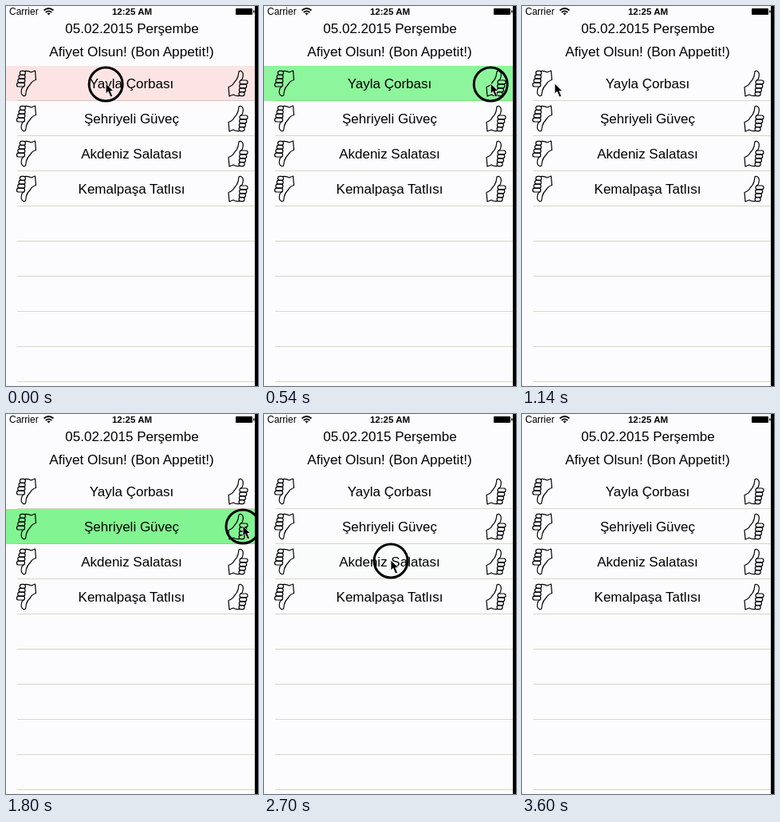
Write an HTML page that moves like this. It is 316 px wide and 476 px high and loops after 3690 ms.

```html
<!DOCTYPE html>
<html lang="tr">
<head>
<meta charset="utf-8">
<style>
  html, body { margin: 0; width: 100%; height: 100%; overflow: hidden; background: #fcfcfe; }
  svg { display: block; width: 316px; height: 476px; }
  text { font: 17px "Liberation Sans", Arial, sans-serif; text-anchor: middle; }
  .line { fill: none; stroke: #000; }
</style>
</head>
<body>
<svg viewBox="0 0 316 476">
  <defs>
    <g id="thumb" class="line" stroke-width="1.2" stroke-linejoin="round">
      <path d="M16 13L18 12Q20 7 19 4Q17 0 14 2L13 8Q12 12 8 16Q6 20 1 21.5L2 33L7 31Q10 33 15 32.5"/>
      <g id="fingers"></g>
    </g>
  </defs>
  <rect width="316" height="476" fill="#fcfcfe"/>
  <g id="lines" stroke="#d6d6c6"></g>
  <rect id="highlight" width="312" height="44"/>

  <text x="4" y="11" style="font-size:12px;text-anchor:start">Carrier</text>
  <g class="line" stroke-width="1.7">
    <path d="M47.5 5.5Q53.5 .5 59.5 5.5M49.7 8Q53.5 4.8 57.3 8"/>
    <path d="M53.5 11.5L51.5 9.3Q53.5 7.8 55.5 9.3Z" fill="#000" stroke="none"/>
  </g>
  <text x="158" y="11" style="font-size:11.5px;font-weight:bold">12:25 AM</text>
  <rect x="288" y="3" width="21" height="8" rx="1"/>
  <rect x="310" y="5.5" width="1.5" height="3"/>

  <text x="158" y="34">05.02.2015 Perşembe</text>
  <text x="157.5" y="63" style="font-size:17.2px">Afiyet Olsun! (Bon Appetit!)</text>
  <g id="rows"></g>
  <rect x="312" width="4" height="476"/>

  <g id="pointer">
    <circle id="ring" class="line" cy="1" r="21" stroke-width="3"/>
    <path d="M0 0V13L3 10.3L5.8 17L8.5 15.8L5.8 9.5H9.7Z" stroke="#fff" stroke-width=".8"/>
  </g>
</svg>
<script>
const LOOP = 3690, STEP = 30;
const TOP = 75, ROW = 44, LEFT = 41, RIGHT = 297, MIDDLE = 156;
const dishes = ["Yayla Çorbası", "Şehriyeli Güveç", "Akdeniz Salatası", "Kemalpaşa Tatlısı"];
// One left-to-right swipe per row; the first is already under way when the loop starts
const swipes = [
  { start: -431, end: 692 },
  { start: 1200, end: 1800 },
  { start: 2015, end: 3460 }
];

const $ = id => document.getElementById(id);
const repeat = (count, make) => Array.from({ length: count }, (_, i) => make(i)).join("");
const mix = (a, b, u) => a + (b - a) * u;
const ease = (from, to, at) => {
  const u = Math.min(1, Math.max(0, (at - from) / (to - from)));
  return u * u * (3 - 2 * u);
};

$("fingers").innerHTML = repeat(4, i =>
  `<rect x="${15 - i * .3}" y="${13 + i * 4.9}" width="${10 - i}" height="4.9" rx="2.3"/>`);

$("lines").innerHTML = repeat(9, i => `<path d="M14 ${TOP + ROW * (i + 1) - .5}H312"/>`);

$("rows").innerHTML = repeat(dishes.length, i => {
  const y = TOP + i * ROW;
  return `<use href="#thumb" transform="translate(38.5 ${y + 39}) rotate(180)"/>
    <text x="157.5" y="${y + 28}">${dishes[i]}</text>
    <use href="#thumb" x="278" y="${y + 5}"/>`;
});

// Swipes run left to right; in between the pointer goes back left, then down a row
function pointerAt(t) {
  const row = swipes.findIndex(swipe => t <= swipe.end);
  if (row < 0) return null;
  const { start, end } = swipes[row];
  if (t >= start) return { x: mix(LEFT, RIGHT, ease(start, end, t)), row, pressed: true };
  const rest = swipes[row - 1].end;
  const u = (t - rest) / (start - rest);
  return { x: mix(RIGHT, LEFT, ease(0, .8, u)), row: row - 1 + ease(.9, 1, u), pressed: false };
}

// Red to the left of the middle, green to the right, stronger with distance
function tint(x) {
  const rgb = x < MIDDLE ? "255,30,20" : "0,235,30";
  return `rgba(${rgb},${Math.abs(x - MIDDLE) / 290})`;
}

function draw(now) {
  const pointer = pointerAt(Math.floor(now % LOOP / STEP) * STEP);
  const pressed = pointer && pointer.pressed;

  $("pointer").style.display = pointer ? "" : "none";
  $("ring").style.display = $("highlight").style.display = pressed ? "" : "none";
  if (pointer) {
    $("pointer").setAttribute("transform", `translate(${pointer.x} ${97 + 43 * pointer.row})`);
  }
  if (pressed) {
    $("highlight").setAttribute("y", TOP + ROW * pointer.row);
    $("highlight").setAttribute("fill", tint(pointer.x));
  }
}

const began = performance.now();
function tick() {
  draw(performance.now() - began);
  requestAnimationFrame(tick);
}
tick();
</script>
</body>
</html>
```
